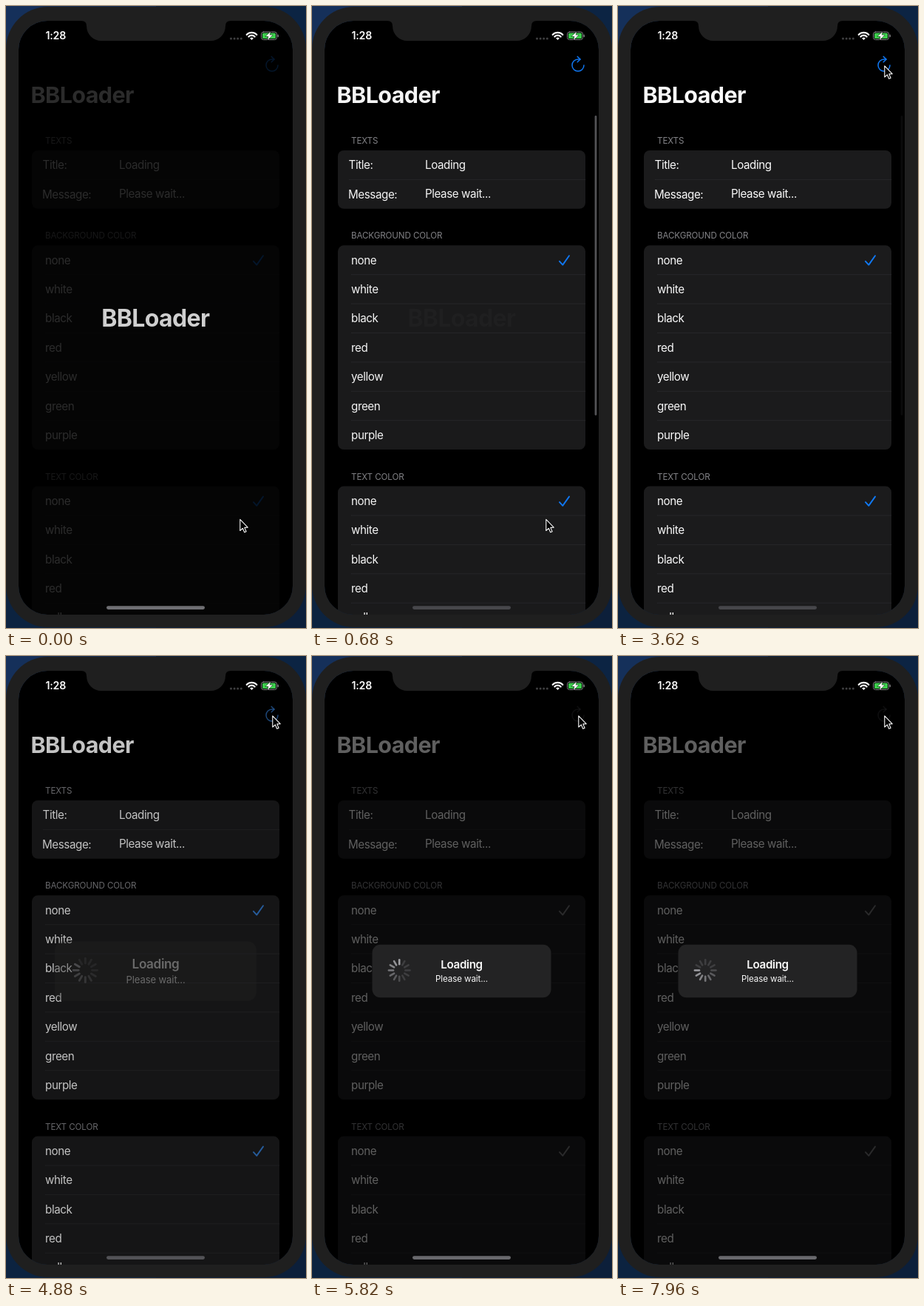
These frames come from a looping animation (406 by 840 pixels, 8 s). An HTML page with a canvas:

```html
<!DOCTYPE html>
<html lang="en">
<head>
<meta charset="utf-8">
<title>BBLoader</title>
<style>
  html, body { margin: 0; width: 100%; height: 100%; overflow: hidden; background: #000; }
  canvas { display: block; width: 100vw; height: 100vh; }
</style>
</head>
<body>
<canvas id="stage" width="406" height="840"></canvas>
<script>
const ctx = document.getElementById('stage').getContext('2d');
const W = 406, H = 840, LOOP = 8000;
const ROW = 39.4, LEFT = 35, RIGHT = 370;
const INK = '#fafafa', CELL = '#1b1b1c', BEZEL = '#1f1f1f', HEADER = '#858589';
const BLUE = [16, 122, 248], MUTED = [110, 110, 114];
const COLORS = ['none', 'white', 'black', 'red', 'yellow', 'green', 'purple'];

const clamp = v => Math.max(0, Math.min(1, v));
const span = (t, from, to) => clamp((t - from) / (to - from));
const smooth = u => u * u * (3 - 2 * u);
const mix = (a, b, u) => a + (b - a) * u;
const blend = (a, b, u) => `rgb(${a.map((v, i) => Math.round(mix(v, b[i], u))).join(',')})`;

function text(str, x, y, size, { weight = 400, color = INK, gap = -0.42, align = 'left' } = {}) {
  ctx.font = `${weight} ${size}px Inter, sans-serif`;
  ctx.letterSpacing = gap + 'px';
  ctx.textAlign = align;
  ctx.fillStyle = color;
  ctx.fillText(str, x, y);
}

function box(x, y, w, h, r, color) {
  ctx.fillStyle = color;
  ctx.beginPath();
  ctx.roundRect(x, y, w, h, r);
  ctx.fill();
}

function line(points, color, width) {
  ctx.strokeStyle = color;
  ctx.lineWidth = width;
  ctx.beginPath();
  points.forEach(([x, y]) => ctx.lineTo(x, y));
  ctx.stroke();
}

function withAlpha(alpha, draw) {
  if (alpha <= 0) return;
  ctx.save();
  ctx.globalAlpha *= alpha;
  draw();
  ctx.restore();
}

function separator(x, y) {
  line([[x, y], [RIGHT, y]], 'rgba(84,84,96,.2)', 1);
}

function colorSection(title, top, tint) {
  text(title, 53, top - 9, 11.6, { color: HEADER, gap: -0.1 });
  box(LEFT, top, RIGHT - LEFT, ROW * COLORS.length, 8, CELL);
  COLORS.forEach((name, i) => {
    const y = top + ROW * i;
    text(name, 53, y + 25.2, 15.2);
    if (i) separator(53, y);
  });
  line([[335, top + 21.5], [339.3, top + 26.3], [348, top + 14]], tint, 1.9);
}

function refreshIcon(tint) {
  ctx.strokeStyle = tint;
  ctx.lineWidth = 1.5;
  ctx.beginPath();
  ctx.arc(360, 80, 8, 0, Math.PI * 1.5);
  ctx.lineTo(363, 72);
  ctx.stroke();
  line([[359.2, 68.2], [363, 72], [359.2, 75.8]], tint, 1.5);
}

function listPage(dim) {
  const tint = blend(BLUE, MUTED, dim);
  withAlpha(1 - 0.65 * dim, () => refreshIcon(tint));
  text('BBLoader', 33.5, 131, 30.5, { weight: 700, gap: -0.6 });

  text('TEXTS', 53, 185.8, 11.6, { color: HEADER, gap: -0.1 });
  box(LEFT, 195, RIGHT - LEFT, ROW * 2, 8, CELL);
  separator(50, 195 + ROW);
  text('Title:', 49.5, 220.3, 15.2);
  text('Loading', 153, 219.6, 15.2);
  text('Message:', 49, 259.7, 15.2);
  text('Please wait...', 153, 259, 15.2);

  colorSection('BACKGROUND COLOR', 323.3, tint);
  colorSection('TEXT COLOR', 648.6, tint);
}

function spinner(x, y, t) {
  const head = Math.round((t - 5820) / 64.8);
  for (let i = 0; i < 12; i++) {
    const age = (((head - i) % 12) + 12) % 12;
    const angle = i * Math.PI / 6 - Math.PI / 2;
    const c = Math.cos(angle), s = Math.sin(angle);
    line([[x + c * 8.2, y + s * 8.2], [x + c * 14.3, y + s * 14.3]],
      blend([160, 160, 164], [62, 62, 64], Math.min(1, age / 7)), 2.6);
  }
}

function loader(t, shown) {
  withAlpha(shown, () => {
    const scale = mix(1.2, 1, shown);
    ctx.translate(202.5, 425.5);
    ctx.scale(scale, scale);
    box(-121, -35.7, 242, 71.4, 11, '#232324');
    spinner(-84.3, -1, t);
    text('Loading', 0, -3.3, 15.2, { weight: 600, align: 'center', gap: -0.35 });
    text('Please wait...', 0, 14.5, 11.6, { align: 'center', gap: -0.1 });
  });
}

function deviceBody() {
  ctx.beginPath();
  ctx.rect(0, 0, W, H);
  ctx.roundRect(17, 20, 371, 802, 39);
  ctx.save();
  ctx.clip('evenodd');
  [['#15305a', 0, 0], ['#0c2443', 203, 0], ['#0c2340', 0, 420], ['#0c1f3a', 203, 420]]
    .forEach(([color, x, y]) => box(x, y, 203, 420, 0, color));
  box(0, 1, W, H - 2, 57, BEZEL);
  ctx.restore();

  // notch with flared shoulders
  ctx.fillStyle = BEZEL;
  ctx.beginPath();
  ctx.moveTo(102, 19);
  ctx.lineTo(102, 20);
  ctx.quadraticCurveTo(109, 20, 109, 27);
  ctx.arcTo(109, 47, 129, 47, 20);
  ctx.arcTo(297, 47, 297, 27, 20);
  ctx.quadraticCurveTo(297, 20, 304, 20);
  ctx.lineTo(304, 19);
  ctx.fill();
}

function statusBar() {
  text('1:28', 53.5, 45.3, 14.2, { weight: 600, gap: -0.2 });
  for (let i = 0; i < 4; i++) box(303 + i * 4.6, 42.6, 3, 3, 1.5, '#404042');

  ctx.strokeStyle = INK;
  ctx.lineWidth = 2.2;
  [5.8, 9.6].forEach(r => {
    ctx.beginPath();
    ctx.arc(332.5, 45.5, r, -Math.PI * 0.75, -Math.PI * 0.25);
    ctx.stroke();
  });
  ctx.fillStyle = INK;
  ctx.beginPath();
  ctx.moveTo(332.5, 46);
  ctx.arc(332.5, 46, 3.4, -Math.PI * 0.75, -Math.PI * 0.25);
  ctx.fill();

  ctx.strokeStyle = '#808082';
  ctx.lineWidth = 1;
  ctx.beginPath();
  ctx.roundRect(345.5, 35, 21, 10.5, 3);
  ctx.stroke();
  box(347, 36.5, 18, 7.5, 1.5, '#3ccb4c');
  box(367.6, 38.5, 1.4, 3.6, 0.7, '#808082');
  ctx.fillStyle = INK;
  ctx.strokeStyle = '#000';
  ctx.beginPath();
  [[358, 34.8], [351.5, 41], [355.3, 41], [354, 46], [360.8, 39.3], [356.8, 39.3]]
    .forEach(([x, y]) => ctx.lineTo(x, y));
  ctx.closePath();
  ctx.stroke();
  ctx.fill();
}

function pointer(t) {
  const u = smooth(span(t, 1200, 2475));
  ctx.save();
  ctx.translate(mix(316.8, 360.8, u), mix(693.3, 80.8, u));
  ctx.beginPath();
  [[0, 0], [0, 15.2], [3.5, 12], [5.9, 17.4], [8.3, 16.4], [6, 11.1], [10.4, 10.9]]
    .forEach(([x, y]) => ctx.lineTo(x, y));
  ctx.closePath();
  ctx.fillStyle = '#000';
  ctx.fill();
  ctx.strokeStyle = INK;
  ctx.lineWidth = 1.1;
  ctx.stroke();
  ctx.restore();
}

function draw(t) {
  const splash = 0.83 * (1 - span(t, 0, 820)) ** 2;
  const shown = smooth(span(t, 4700, 5150));
  const bar = span(t, 80, 920) * (1 - 0.9 * span(t, 3200, 3600)) * (1 - span(t, 3600, 3760));

  ctx.fillStyle = '#000';
  ctx.fillRect(0, 0, W, H);
  listPage(shown);
  withAlpha(bar, () => box(382.6, 148, 2.8, 405, 1.4, '#78787c'));
  withAlpha(0.62 * shown, () => box(0, 0, W, H, 0, '#000'));
  withAlpha(splash, () => {
    box(0, 0, W, H, 0, '#000');
    text('BBLoader', 202.3, 432.7, 32, { weight: 700, gap: -0.65, align: 'center' });
  });
  loader(t, shown);
  deviceBody();
  statusBar();
  const glow = Math.max(splash, shown * 0.7);
  box(136, 810.3, 133, 4.6, 2.3, blend([70, 70, 74], [120, 120, 124], glow));
  pointer(t);
}

ctx.lineJoin = 'round';
ctx.lineCap = 'round';
const start = performance.now();
function tick() {
  draw((performance.now() - start) % LOOP);
  requestAnimationFrame(tick);
}
tick();
</script>
</body>
</html>
```
